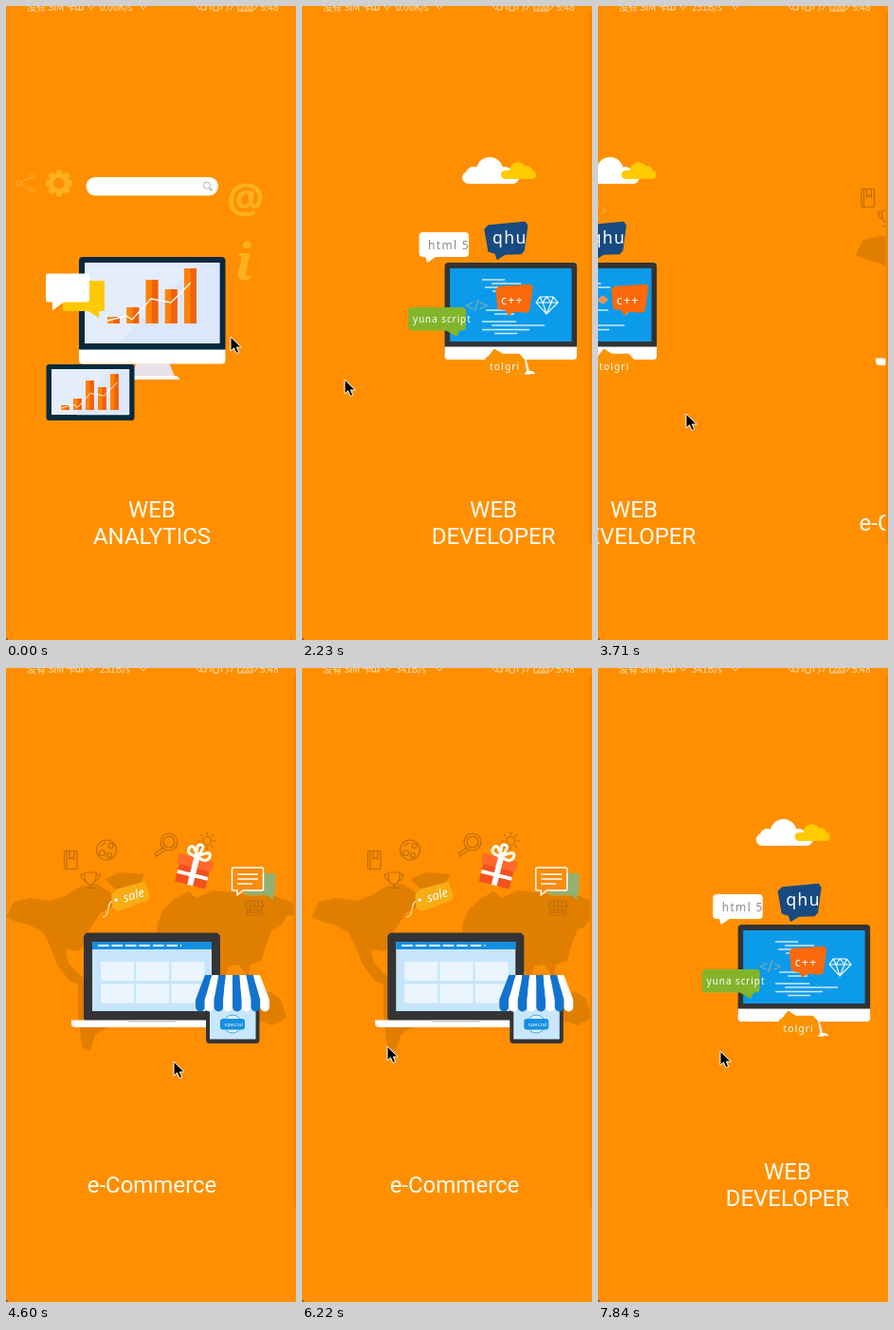
These frames come from a looping animation (306 by 667 pixels, 7.99 s). An HTML page:

```html
<!DOCTYPE html>
<html lang="en">
<head>
<meta charset="utf-8">
<title>Onboarding pages</title>
<style>
  html, body { margin: 0; width: 100%; height: 100%; overflow: hidden; background: #ff8f00; }
  svg { display: block; width: 306px; height: 667px; }
  .title { font: 24px Roboto, sans-serif; fill: #fffdf2; text-anchor: middle; }
  .tag { font-family: "Noto Sans", sans-serif; fill: #fff; }
  .status { font: 10px "Noto Sans CJK SC", "Noto Sans CJK", Roboto, sans-serif; fill: #ffe3bd; }
  .icon { fill: none; stroke: #bd6c08; stroke-width: 1.2; }
  .wire { fill: none; stroke: #fff; }
</style>
</head>
<body>
<svg id="stage" viewBox="0 0 306 667"></svg>
<script>
const LOOP = 7990, STEP = 147.84, PAGE = 306;

// time, cursor x, cursor y, scroll position
const track = [
  [0, 237, 348, 0], [300, 236, 348, 0], [750, 212, 352, 15], [1335, 156, 364, 71],
  [1930, 62, 389, 165], [2080, 46, 393, 186], [2222, 45, 393, 258], [2380, 80, 398, 298],
  [2520, 130, 405, 306], [2670, 190, 412, 306], [2960, 219, 420, 306], [3260, 190, 424, 325],
  [3700, 93, 429, 422], [4000, 48, 430, 468], [4150, 60, 428, 540], [4300, 105, 424, 596],
  [4450, 150, 418, 611], [4587, 177, 414, 612], [5040, 180, 412, 612], [5700, 62, 398, 612],
  [6070, 73, 398, 612], [6214, 90, 398, 605], [6520, 160, 402, 536], [6800, 215, 406, 480],
  [6950, 205, 406, 380], [7100, 140, 404, 320], [7250, 85, 403, 306], [7400, 73, 403, 306],
  [7550, 88, 403, 300], [7840, 129, 403, 260], [7990, 129, 403, 260]
];

const rect = (x, y, w, h, fill, r = 0) =>
  `<rect x="${x}" y="${y}" width="${w}" height="${h}" rx="${r}" fill="${fill}"/>`;
const poly = (points, fill) =>
  `<polygon points="${points}" fill="${fill}" stroke="${fill}" stroke-width="1.5" stroke-linejoin="round"/>`;
const dot = (x, y, r, fill) => `<circle cx="${x}" cy="${y}" r="${r}" fill="${fill}"/>`;
const path = (d, attrs) => `<path d="${d}" ${attrs}/>`;
const tag = (x, y, size, gap, text, attrs = "") =>
  `<text class="tag" x="${x}" y="${y}" font-size="${size}" letter-spacing="${gap}" ${attrs}>${text}</text>`;
const title = (...lines) => lines.map((text, i) =>
  `<text class="title" x="154" y="${lines.length > 1 ? 537.7 + i * 28.5 : 551.7}">${text}</text>`).join("");
const times = (n, fn) => Array.from({ length: n }, (_, i) => fn(i)).join("");

function chart(x, base, width, pitch, heights) {
  const bars = heights.map((h, i) => {
    const left = x + i * pitch;
    return rect(left, base - h, width, h, "#ff8208") + rect(left + width / 2, base - h, width / 2, h, "#f0620c");
  }).join("");
  const k = width / 13;
  const line = [[0, 3], [20, 8], [26, 4], [46, 26], [67, 22], [88, 43]]
    .map(([px, py]) => `${x + px * k},${base - py * k}`).join(" ");
  return bars + `<polyline class="wire" points="${line}" stroke-width="${1.2 * k + .1}"/>`;
}

const gear = times(8, i => `<rect x="-3.2" y="-14" width="6.4" height="7" rx="1.5" transform="rotate(${i * 45})"/>`) +
  `<circle r="8.4" fill="none" stroke="#ffb01f" stroke-width="5"/>`;

const awning = times(8, i => {
  const top = 210 + i * 7.25, low = 200 + i * 9.75;
  return path(`M${top} 323h7.25L${low + 9.75} 349v7.5a4.87 4.87 0 0 1-9.75 0v-7.5z`,
    `fill="${i % 2 ? "#fff" : "#1273ce"}"`);
});

const sun = times(8, i => path("M0-6.5V-9.5", `transform="translate(212 182) rotate(${i * 45})"`));

// horizontal and vertical parallax factors per layer
const pages = [
  { origin: 0, layers: [
    [1, 0, title("WEB", "ANALYTICS")],
    [1.15, 0, `<g fill="none" stroke="#ffa62b" stroke-width="1.2"><path d="M16 186L25 180M16 187L25 193"/>
      <circle cx="14" cy="186.500" r="2.600"/><circle cx="27.500" cy="179" r="2.600"/><circle cx="27.500" cy="193.500" r="2.600"/></g>`],
    [1.2, 0, `<g transform="translate(56 186.500)" fill="#ffb01f">${gear}</g>`],
    [1.07, 0, rect(84.5, 180, 139.5, 19.5, "#fff", 9.7) +
      path("M214.500 191.500l3 3", 'stroke="#b9b9b9" stroke-width="2"') +
      '<circle cx="212" cy="188.700" r="3.300" fill="none" stroke="#c4c4c4" stroke-width="1.200"/>'],
    [1.13, .83, `<text x="233" y="219" font-family="Open Sans, sans-serif" font-weight="700" font-size="44" fill="#ffb01f">@</text>`],
    [1.35, 0, `<text x="251" y="287.500" text-anchor="middle" font-family="Noto Serif, serif" font-weight="700" font-style="italic" font-size="52" fill="#ffb01f">i</text>`],
    [1.41, .41, poly("138,377 172,377 177,389 132,389", "#e7e2e8") +
      path("M126 393q1-4 5-4h47q4 0 5 4z", 'fill="#fff"') +
      rect(77, 264, 154.5, 104, "#06293f", 4) + rect(83, 270, 142.5, 85, "#e4edfc") +
      poly("203,271 224.500,271 224.500,354 120,354", "#dce7fb") +
      path("M77 361.500h154.500v11q0 4-4 4H81q-4 0-4-4z", 'fill="#fff"') +
      chart(107, 334, 13, 20.25, [7, 17, 46, 36, 58])],
    [1.155, 0, rect(42.5, 377, 93, 59, "#06293f", 3) + rect(48, 382, 82, 48, "#e4edfc") +
      poly("110,383 129.500,383 129.500,429.500 75,429.500", "#dce7fb") +
      chart(58, 425, 8.8, 13, [5, 12, 31, 24, 38])],
    [1.03, 0, path("M62 289h40q2 0 2 2v28q0 2-2 2h-4v7l-11-7H62q-2 0-2-2v-28q0-2 2-2z", 'fill="#ffc800"') +
      path("M44 281.500h42q2 0 2 2v26q0 2-2 2H61l-12 9v-9h-5q-2 0-2-2v-26q0-2 2-2z", 'fill="#fff"')]
  ] },
  { origin: 48, layers: [
    [1, 0, title("WEB", "DEVELOPER").replaceAll('x="154"', 'x="202"')],
    [1.13, 0, rect(169, 174, 60, 13, "#fff", 6.5) + dot(181, 177, 8, "#fff") + dot(198, 173, 14, "#fff") +
      dot(214, 178, 9, "#fff") + rect(210, 173, 37, 9, "#ffca00", 4.5) + dot(228, 173, 8.8, "#ffca00") +
      dot(237, 174.5, 6.5, "#ffca00")],
    [1.39, 0, poly("204,372 236,372 240,387 200,387", "#ebe8ec") + path("M194 387q1-3 5-3h42q4 0 5 3z", 'fill="#fff"') +
      rect(150.5, 270, 139.5, 98, "#333335", 4) + rect(156, 276, 128.5, 77, "#0b9bea") +
      path("M150.500 358.500H290v10q0 3.500-4 3.500H154.500q-4 0-4-3.500z", 'fill="#fff"') +
      path("M190 288h24M200 292h31M193 296h48M201 300h18M194 320h45M203 324h21M190 332h36M200 336h56M190 340.500h50M203 344.500h24",
        'class="wire" stroke-width="1.700" opacity=".8"') +
      poly("228,309 233,305 238,309 233,313", "#e89458") +
      path("M251 306h14l5 6-12 12-11-12zM247 312h23M251 306l3 6 4 12 5-12 2-6M254 312l4-6 5 6",
        'class="wire" stroke-width="1.100"')],
    [1.13, .61, tag(172, 321, 16, 0, "&lt;/&gt;", 'style="fill:#ffb870" opacity=".5"')],
    [1.1, 0, rect(123.5, 238, 52.5, 26, "#fff", 4) + poly("131,264 140,264 132.500,269", "#fff") +
      tag(133, 255.500, 12, 1.3, "html 5", 'style="fill:#8b8b8b"')],
    [1.27, 0, poly("193,235 197,231 235,227.500 237.500,231 234,257 231,260.500 214,261 206,266 204,260 197,258", "#174a80") +
      tag(201, 250, 17.500, 1.4, "qhu")],
    [1.16, 0, poly("205,298 208,295.500 241,293.500 243,296 239.500,320 237,322 223,321 218,325 216,320 207,318", "#fb690b") +
      tag(210, 313.500, 12.500, 1.2, "c++")],
    [1.1, 0, rect(112, 317, 61, 24.5, "#83b52c", 4) + poly("153,341 166,341 163,347", "#83b52c") +
      tag(117, 332.500, 10, .9, "yuna script")],
    [1.2, 0, poly("194,371 198,368 203,361.500 211,366.500 229,366.500 234,372 236,384 234,387 195,387.500", "#fa9300") +
      tag(198, 383, 10, 1.2, "tolgri")]
  ] },
  { origin: 0, layers: [
    [1.43, 0, `<g fill="#e07e00">
      <path d="M0 262l8-16 18-4 22 3 16-6 14-9 18-3 14 9 8 12-18 9-9 14-8 12 2 7-8 8-14-2 3 15 10 10 9 8v8l-18-8-13-17-7-18-8-16-15-8-13-3z"/>
      <path d="M104 222l17-7 25 2-5 11-12 14-10-6z"/>
      <path d="M76 330l20-3 26 22-9 25-19 12-5 17-9-4-4-34z"/>
      <path d="M160 268l6-14 12-11 14-8 9 7 17-8 22 2 18 4 22-1 24 8 14 6-8 8-13-1-8 12-8 3-7 17-4 16-12 4-3 14-9-14-11 2-5 15-9-18-20-8-14 6-14-10-16 2z"/>
      <path d="M140 290h45l24 31-22 55-16 3-8-38-23-14zM260 350l18-10 12 8 6 20-15 8-21-7z"/></g>`],
    [1, 0, title("e-Commerce")],
    [1.14, 0, `<g class="icon"><rect x="61.500" y="192.500" width="13.500" height="19" rx="1.500"/><path d="M64 193v18M67 193v8l3-2 2 2v-8"/>
      <circle cx="106" cy="191.500" r="10.500"/><circle cx="101.500" cy="194.500" r="3"/><circle cx="110.500" cy="187" r="2.500"/><circle cx="109" cy="197" r="2.500"/><path d="M100 187l5-3"/>
      <circle cx="172" cy="183" r="9"/><circle cx="172" cy="183" r="6"/><path d="M165.500 189l-8 6 1 3 9-6"/>
      <circle cx="212" cy="182" r="4.500"/>${sun}
      <path d="M83 215h12v4q0 8-6 9-6-1-6-9zM83 217h-4q1 7 6 7M95 217h4q-1 7-6 7M89 228v3M83 231.500h12"/>
      <path d="M254 245h16l2 6h-20zM254 251v9h16v-9M257 254h10v3h-10zM258 245v6M262 245v6M266 245v6"/></g>`],
    [1.17, 0, path("M117 244q-8 0-9 9t-6 9", 'fill="none" stroke="#ffdfa8" stroke-width="1.300"') +
      poly("112,238 117,233.500 146,225.500 151,240 149,244 118,255 113,252", "#f8ad13") + dot(116, 244, 1.8, "#fff") +
      tag(125, 246.500, 13, 0, "sale", 'font-style="italic" transform="rotate(-17 125 246.500)"')],
    [1.22, 0, `<g transform="translate(198 213) rotate(14)">${rect(-16.5, -5, 33, 21, "#f4511e")}
      ${rect(-19, -14, 38, 11, "#ff6a2a", 1)}${rect(-3, -14, 6, 30, "#fff")}${rect(-16.5, 3, 33, 4, "#fff")}
      <path d="M0-15q-13 0-10-7t10 7q-5-13 1-13t-1 13q14-11 13-3t-13 3z" class="wire" stroke-width="3"/></g>`],
    [1.18, 0, path("M254 216h28q2 0 2 2v19q0 2-2 2v5l-6-5h-22q-2 0-2-2v-19q0-2 2-2z", 'fill="#91b071"') +
      path("M240 210h30q1.500 0 1.500 1.500v20.500q0 2-1.500 2h-20l-6 5v-5h-4q-1.500 0-1.500-2v-20.500q0-1.500 1.500-1.500z",
        'fill="#fb8c0b" stroke="#fff" stroke-width="1.500"') +
      path("M244 217h22M244 222h22M244 227h16", 'class="wire" stroke-width="1.600"')],
    [1.18, 0, rect(82, 278.500, 144, 94, "#343437", 5) + rect(91, 288, 126, 73, "#c6e5fb") +
      rect(91, 288, 126, 8, "#1590df") + path("M97 292h88", 'class="wire" stroke-width="1.800" stroke-dasharray="11.500 3"') +
      times(6, i => rect(100 + i % 3 * 37.2, i < 3 ? 309 : 332.5, 35, 20, "#eaf5fe")) +
      path("M69 370.500h168v4q0 3.500-5 3.500H74q-5 0-5-3.500z", 'fill="#fff"') + rect(128, 370.500, 52, 2, "#d2d2d6", 1)],
    [1.18, 0, rect(211, 323, 56.5, 72, "#343437", 4) + rect(215, 328, 48.5, 62.5, "#c9e7fb") + awning +
      '<circle cx="239" cy="374.500" r="9.500" fill="#dcf0fc" stroke="#4aa5e2"/>' +
      rect(226, 369, 26, 11.5, "#168fdf", 3) + tag(230.500, 377, 5.500, .3, "special")]
  ] }
];

const stage = document.getElementById("stage");
stage.innerHTML = pages.map(({ layers }) => layers.map(([, , art]) => `<g class="layer">${art}</g>`).join("")).join("") + `
  <rect id="edge" x="303.500" y="8" width="2.500" height="559" fill="#ef8400"/>
  <g class="status"><text x="22" y="5">没有 SIM 卡</text><text id="rate" x="99" y="5"></text>
    <text x="268" y="5">5:48</text><text x="247" y="4" font-size="7">100</text>
    <path d="M74 0v4h7V0M77.500 0v4M87 0l3 3 3-3M90 4.500v.5M142 0l3 3 3-3M145 4.500v.5M201 0l4 4M206 0v4h5V0M216 0v4M219 0v5h5V0M228 0l-1 4M233 0q3 3-1 5M239 0l-2 4M245 0v5h15V0M262 4l3-4"
      fill="none" stroke="#ffe3bd"/></g>
  <path d="M0 664v3h3z" fill="#8d5a1c"/>
  <path id="cursor" d="M0 0v15l3.500-3.200L6 17.500l2.800-1.200-2.500-5.300h5z" fill="#000" stroke="#fff"/>`;

const layerNodes = [...stage.querySelectorAll(".layer")];
const layers = pages.flatMap((page, index) =>
  page.layers.map(([fx, fy]) => ({ index, origin: page.origin, fx, fy })));
const [edge, rate, cursor] = ["edge", "rate", "cursor"].map(id => document.getElementById(id));

function sample(t) {
  const next = Math.max(1, track.findIndex(key => key[0] >= t));
  const a = track[next - 1], b = track[next];
  const k = (t - a[0]) / (b[0] - a[0]);
  return a.map((v, i) => v + (b[i] - v) * k);
}

function draw(time) {
  // the screen refreshes in even steps after a short hold
  const t = time < 290 ? 0 : 300 + Math.floor((time - 290) / STEP) * STEP;
  const [, x, y, scroll] = sample(t);
  layers.forEach(({ index, origin, fx, fy }, i) => {
    const shift = index * PAGE - scroll - origin;
    layerNodes[i].setAttribute("transform", `translate(${shift * fx} ${shift * fy})`);
  });
  cursor.setAttribute("transform", `translate(${x} ${y})`);
  edge.style.display = t ? "" : "none";
  rate.textContent = t < 2900 ? "0.00K/s" : t < 5900 ? "251B/s" : "341B/s";
}

const start = performance.now();
function tick() {
  draw((performance.now() - start) % LOOP);
  requestAnimationFrame(tick);
}
tick();
</script>
</body>
</html>
```
